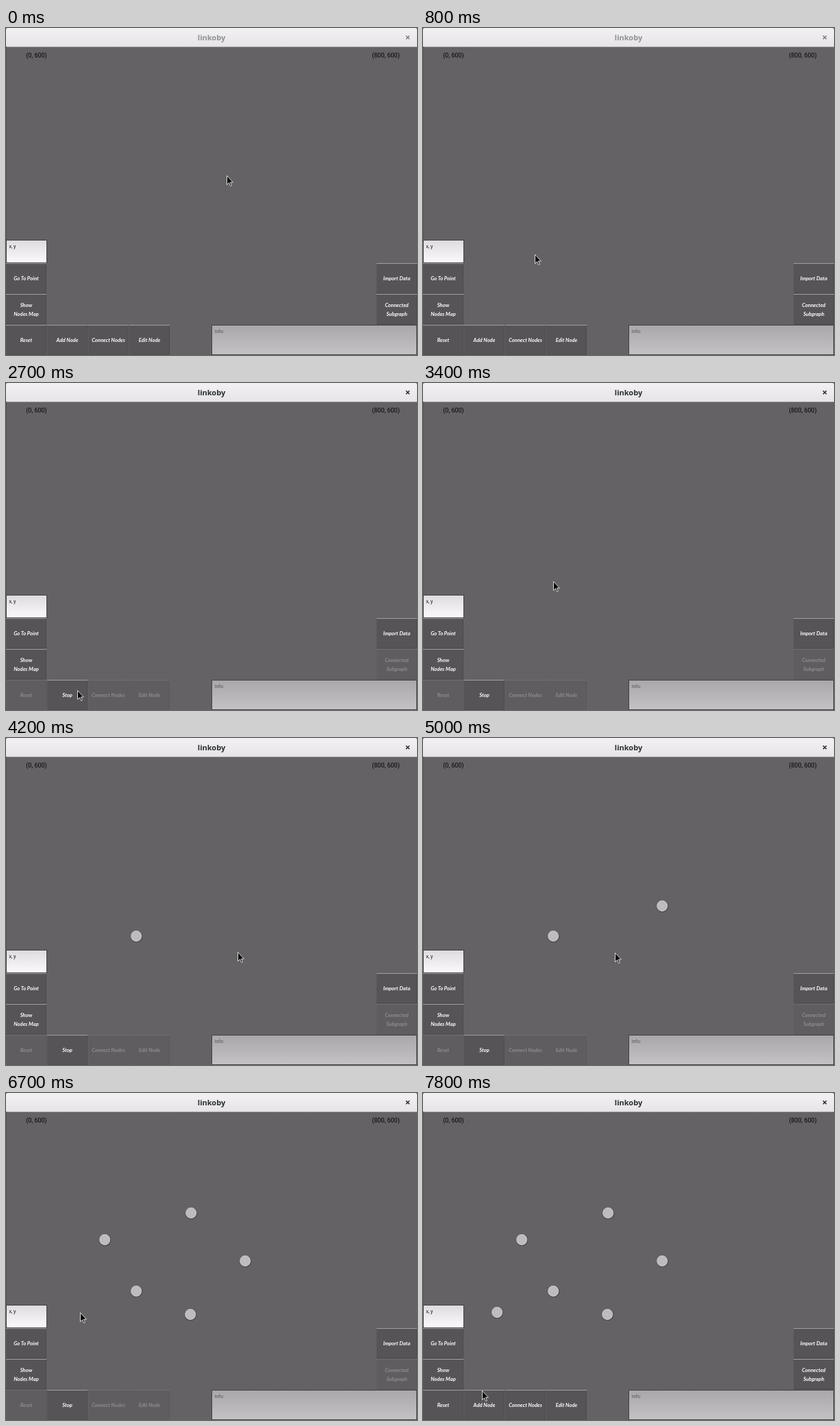
Recreate the animation shown at these times as an HTML page. Size 600 by 477 pixels, loop 8 s.

```html
<!DOCTYPE html>
<html lang="en">
<head>
<meta charset="utf-8">
<title>Node editor</title>
<style>
  html, body { margin: 0; width: 100%; height: 100%; overflow: hidden; background: #646264; }
  svg { display: block; width: 100%; height: 100%; }
  text { text-anchor: middle; }
  .title { font: bold 11px "Open Sans", sans-serif; fill: #8f9092; }
  .close { stroke: #7c7d7e; stroke-width: 1.6; }
  .active .title { fill: #2a2d2f; }
  .active .close { stroke: #2a2d2f; }
  .coord { font: 9px Roboto, sans-serif; fill: #050505; }
  .field { font: 7px Roboto, sans-serif; text-anchor: start; }
  .frame { stroke: #434143; }
  .button text { font: italic bold 7.6px Lato, cursive; fill: #fff; }
  .button .face { fill: #565456; }
  .button .edge { stroke: #a09ea0; }
  .button .side { stroke: #4b494b; }
  .disabled text { fill: #8e8c8e; }
  .disabled .face { fill: #5f5d5f; }
  .disabled .edge { stroke: #706e70; }
  .disabled .side { stroke: #5a585a; }
</style>
</head>
<body>
<svg id="stage" viewBox="0 0 600 477">
  <defs>
    <linearGradient id="bar" x2="0" y2="1">
      <stop stop-color="#f3f1f3"/><stop offset="1" stop-color="#e6e4e6"/>
    </linearGradient>
    <linearGradient id="white" x2="0" y2="1">
      <stop stop-color="#dddbde"/><stop offset="1" stop-color="#fcfafc"/>
    </linearGradient>
    <linearGradient id="grey" x2="0" y2="1">
      <stop stop-color="#a9a7a9"/><stop offset="1" stop-color="#c4c2c4"/>
    </linearGradient>
  </defs>
  <rect width="600" height="477" fill="#646264"/>
  <rect width="600" height="27" fill="url(#bar)"/>
  <path d="M0 27.5H600" stroke="#a9a7a9"/>
  <path d="M.5 27V477" stroke="#555355"/>
  <path d="M0 0H3Q0 0 0 3ZM600 0H597Q600 0 600 3Z" fill="#777"/>
  <text class="title" x="300" y="17.5">linkoby</text>
  <path class="close" d="M584 11.2l5 5m0-5l-5 5"/>
  <text class="coord" x="44.5" y="43">(0, 600)</text>
  <text class="coord" x="554.5" y="43">(800, 600)</text>
  <rect class="frame" x=".5" y="309.5" width="59" height="33" fill="url(#white)"/>
  <text class="field" x="4.5" y="321" fill="#111">x, y</text>
  <g id="buttons"></g>
  <rect class="frame" x="300.5" y="433.5" width="299" height="43" fill="url(#grey)"/>
  <text class="field" x="304.5" y="444.5" fill="#555355">Info:</text>
  <g id="nodes"></g>
  <path id="cursor" d="M.5 .5V13.6L3.5 10.8L5.6 15.5L7.5 14.6L5.4 10.1H9.4Z" fill="#080808" stroke="#eee" stroke-width=".9"/>
</svg>
<script>
const LOOP = 8000, STEP = 100, EDIT_START = 2400, EDIT_END = 7700;
const ROW = 45, COLUMN = 60, BOTTOM = 433, RIGHT = 541;
const byId = id => document.getElementById(id);

function add(parent, tag, attrs, text = "") {
  const el = document.createElementNS("http://www.w3.org/2000/svg", tag);
  for (const key in attrs) el.setAttribute(key, attrs[key]);
  el.textContent = text;
  return parent.appendChild(el);
}

function addButton(x, y, label) {
  const g = add(byId("buttons"), "g", { class: "button" });
  const lines = label.split("\n");
  add(g, "rect", { class: "face", x, y, width: 59, height: 44 });
  add(g, "path", { class: "side", d: `M${x + 58.5} ${y}v44h-58`, fill: "none" });
  add(g, "path", { class: "edge", d: `M${x} ${y + .5}h59` });
  lines.forEach((line, i) =>
    add(g, "text", { x: x + 29.5, y: y + 25.3 + 13 * (i - (lines.length - 1) / 2) }, line));
  return g;
}

addButton(0, BOTTOM - 2 * ROW, "Go To Point");
addButton(0, BOTTOM - ROW, "Show\nNodes Map");
addButton(RIGHT, BOTTOM - 2 * ROW, "Import Data");
const subgraph = addButton(RIGHT, BOTTOM - ROW, "Connected\nSubgraph");
const [reset, addNode, connect, edit] = ["Reset", "Add Node", "Connect Nodes", "Edit Node"]
  .map((label, i) => addButton(i * COLUMN, BOTTOM, label));
const lockable = [subgraph, reset, connect, edit];
const addNodeLabel = addNode.querySelector("text");

// Each move ends at (x, y); a click there drops a node as the next move begins.
const moves = [
  { start: 100, end: 300, x: 222, y: 212 },
  { start: 700, end: 1200, x: 104, y: 448 },
  { start: 2900, end: 3400, x: 190, y: 289, click: true },
  { start: 3800, end: 3900, x: 338, y: 312 },
  { start: 4400, end: 4500, x: 349, y: 245, click: true },
  { start: 4700, end: 5200, x: 269, y: 323, click: true },
  { start: 5400, end: 5700, x: 270, y: 175, click: true },
  { start: 6000, end: 6200, x: 144, y: 214, click: true },
  { start: 6400, end: 6700, x: 108, y: 320, click: true },
  { start: 6900, end: 7500, x: 86, y: 434 }
];

function addNodeAt(x, y) {
  const g = add(byId("nodes"), "g", { transform: `translate(${x + .2} ${y})` });
  add(g, "circle", { cx: .2, cy: .3, r: 8.8, fill: "#3c3a3c" });
  add(g, "circle", { r: 8.2, fill: "#bfbdbf" });
  add(g, "circle", { r: 4, fill: "none", stroke: "#b8b6b8", "stroke-width": .6 });
  return g;
}

const nodes = moves.flatMap(({ click, x, y }, i) =>
  click ? { time: moves[i + 1].start, el: addNodeAt(x, y) } : []);

function pointerAt(t) {
  const now = Math.floor(t / STEP) * STEP;
  let x = 322, y = 215;
  for (const move of moves) {
    if (now < move.start) break;
    const progress = Math.min(1, (now - move.start + STEP) / (move.end - move.start + STEP));
    const eased = Math.sin(progress * Math.PI / 2);
    x += (move.x - x) * eased;
    y += (move.y - y) * eased;
  }
  return [x, y].map(Math.round);
}

function draw() {
  const t = performance.now() % LOOP;
  const editing = t >= EDIT_START && t < EDIT_END;
  byId("stage").classList.toggle("active", t >= EDIT_START);
  lockable.forEach(button => button.classList.toggle("disabled", editing));
  addNodeLabel.textContent = editing ? "Stop" : "Add Node";
  nodes.forEach(({ time, el }) => el.setAttribute("visibility", t >= time ? "visible" : "hidden"));
  byId("cursor").setAttribute("transform", `translate(${pointerAt(t)})`);
  requestAnimationFrame(draw);
}
draw();
</script>
</body>
</html>
```
